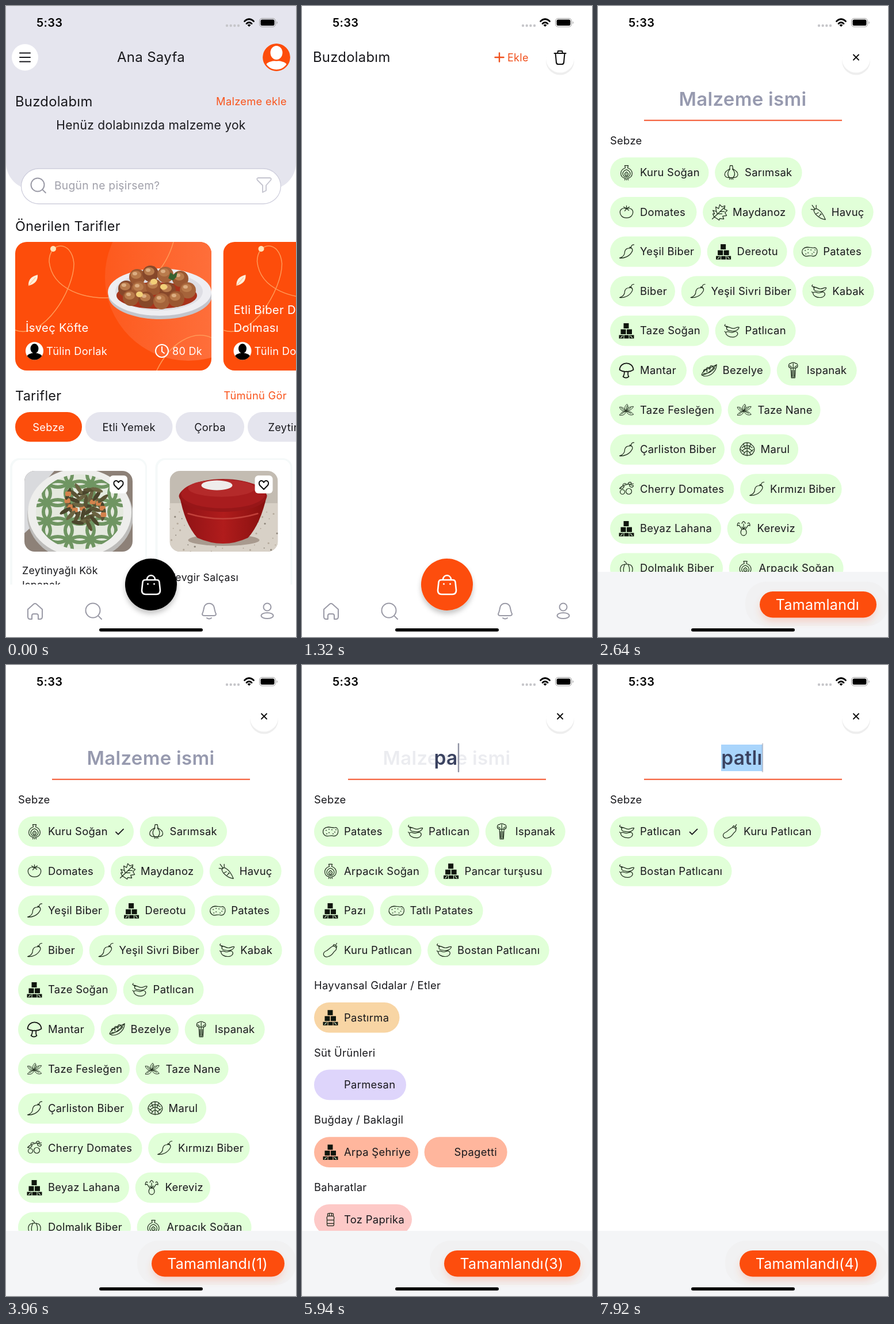
Write an HTML page that moves like this. It is 504 px wide and 1094 px high and loops after 8000 ms.

```html
<!DOCTYPE html>
<html lang="tr">
<head>
<meta charset="utf-8">
<style>
html, body { margin: 0; width: 504px; height: 1094px; overflow: hidden; background: #fff; }
svg { display: block; }
text { font-family: Inter, "Open Sans", sans-serif; letter-spacing: .3px; white-space: pre; }
</style>
</head>
<body>
<svg id="stage" width="504" height="1094" viewBox="0 0 504 1094">
  <defs>
    <filter id="soft" x="-40%" y="-40%" width="180%" height="200%">
      <feDropShadow dx="0" dy="6" stdDeviation="4" flood-opacity=".22"/>
    </filter>
    <filter id="glow" x="-20%" y="-60%" width="140%" height="260%">
      <feDropShadow dx="0" dy="8" stdDeviation="6" flood-color="#ff6a3a" flood-opacity=".2"/>
    </filter>
    <linearGradient id="sheen"><stop stop-color="#fd5a1e"/><stop offset="1" stop-color="#ff7a4a"/></linearGradient>
    <linearGradient id="bowl"><stop stop-color="#8d1215"/><stop offset=".5" stop-color="#b01c1c"/><stop offset="1" stop-color="#86100f"/></linearGradient>
    <clipPath id="card"><rect x="16" y="409" width="341" height="223" rx="20"/></clipPath>
    <clipPath id="photo"><rect x="32" y="806" width="188" height="140" rx="18"/></clipPath>
    <clipPath id="plate"><ellipse cx="128" cy="877" rx="76" ry="65"/></clipPath>
    <clipPath id="feed"><rect y="760" width="504" height="243"/></clipPath>
    <clipPath id="list"><rect y="200" width="504" height="781"/></clipPath>
    <clipPath id="roundButton"><rect x="415" y="80" width="70" height="50"/></clipPath>
    <clipPath id="avatar"><circle r="15.5"/></clipPath>
    <clipPath id="profile"><circle r="23.5"/></clipPath>
  </defs>
  <g id="view"></g>
  <g id="system"></g>
</svg>
<script>
const LOOP = 8000, STEP = 330;
const ORANGE = '#fd4d0b', INK = '#18181c', MIST = '#e5e5ee', GREY = '#9a9aa6';
const $ = id => document.getElementById(id);

const text = (x, y, s, size = 18.5, fill = INK, anchor = 'start', weight = 400) =>
  `<text x="${x}" y="${y}" font-size="${size}" fill="${fill}" text-anchor="${anchor}" font-weight="${weight}">${s}</text>`;
const rect = (x, y, w, h, rx, fill, more = '') =>
  `<rect x="${x}" y="${y}" width="${w}" height="${h}" rx="${rx}" fill="${fill}" ${more}/>`;
const circle = (x, y, r, fill, more = '') => `<circle cx="${x}" cy="${y}" r="${r}" fill="${fill}" ${more}/>`;
const oval = (x, y, rx, ry, fill, more = '') =>
  `<ellipse cx="${x}" cy="${y}" rx="${rx}" ry="${ry}" fill="${fill}" ${more}/>`;
const line = (d, stroke = INK, width = 2) =>
  `<path d="${d}" fill="none" stroke="${stroke}" stroke-width="${width}" stroke-linecap="round" stroke-linejoin="round"/>`;
const at = (x, y, body) => `<g transform="translate(${x} ${y})">${body}</g>`;

function systemBar() {
  const dots = [384, 390.7, 397.3, 404].map(x => circle(x, 34, 2.2, '#c6c6ca')).join('');
  const wifi = line('M414.500 26.500Q422.500 19 430.500 26.500M418 30.500Q422.500 26.500 427 30.500', '#000', 2.7)
    + '<path d="M419.500 33Q422.500 30.500 425.500 33L422.500 36Z"/>';
  const battery = rect(440.5, 21.5, 28, 14.5, 4.5, 'none', 'stroke="#999"')
    + rect(442.5, 23.5, 24, 10.5, 2.8, '#000') + '<path d="M470.500 26.500q2.500 2 0 5z" fill="#999"/>';
  return text(53, 36, '5:33', 20, '#000', 'start', 600) + dots + wifi + battery + rect(162, 1079, 180, 5.5, 2.75, '#000');
}

const magnifier = (x, y, r) =>
  line(`M${x + r * .75} ${y + r * .75}l${r * .45} ${r * .45}`, GREY) + circle(x, y, r, 'none', `stroke="${GREY}" stroke-width="2"`);

function navBar(color) {
  const bag = line('M242 995h20q4 0 4.500 4l1.500 14q0 7-7 7h-18q-7 0-7-7l1.500-14q.5-4 4.500-4M245 994c1-9 13-9 14 0', '#fff', 2.6)
    + circle(246.5, 1002, 1.5, '#fff') + circle(257.5, 1002, 1.5, '#fff');
  return line('M38 1046l10-9q2.500-2 5 0l10 9v13q0 4-4 4h-3v-6q0-3-3-3h-5q-3 0-3 3v6h-3q-4 0-4-4z', GREY)
    + magnifier(151, 1048, 12.5)
    + line('M341 1054c2-4 2-6 3-10c1-11 17-11 18 0c1 4 1 6 3 10q0 3-4 3h-16q-4 0-4-3M349 1061q4 3 8 0', GREY)
    + circle(454, 1042, 6.5, 'none', `stroke="${GREY}" stroke-width="2"`)
    + oval(454, 1057, 10.5, 5, 'none', `stroke="${GREY}" stroke-width="2"`)
    + circle(252, 1003, 45, color, 'filter="url(#soft)"') + bag;
}

const DISH = [[228, 470], [251, 464], [277, 466], [303, 473], [209, 490], [232, 491], [257, 487],
  [281, 493], [316, 493], [217, 506], [244, 509], [270, 512], [296, 508]];

function dish() {
  const balls = DISH.map(([x, y], i) => circle(x, y, 14, ['#9a5731', '#87482a', '#a5633a'][i % 3])
    + oval(x - 2, y - 4, 9, 7, '#b97b4c') + oval(x - 4, y - 6, 4, 3, '#dcae82')).join('');
  return oval(268, 502, 90, 41, '#c3c5cc') + oval(267, 496, 90, 41, '#eeeef2') + oval(266, 495, 76, 33, '#dedee4')
    + oval(262, 502, 70, 23, '#a8331b') + balls
    + [[257, 478], [232, 500], [274, 487]].map(p => oval(...p, 6, 5, '#f2cf78')).join('')
    + '<path d="M282 472l4-10 5 4 7-5-2 9-6 6z" fill="#37612f"/>';
}

const cook = (x, y) => at(x, y, circle(0, 0, 15.5, '#fff')
  + `<g clip-path="url(#avatar)">${oval(0, -4, 7, 8.5, '#000')}${oval(0, 10, 13, 6.5, '#000')}</g>`);

function featured(x, title, plate) {
  const swirl = line('M16 562C66 580 119 490 118 446C114 405 75 408 75 443C80 492 140 511 190 505C246 493 279 452 291 409M262 632C285 584 325 561 357 575', '#ff9a58', 1.5);
  const heading = title.map((s, i) => text(34, 565 - 31 * (title.length - 1 - i), s, 20.3, '#fff')).join('');
  return at(x - 16, 0, `<g clip-path="url(#card)">${rect(16, 409, 341, 223, 0, ORANGE)}${circle(317, 470, 145, 'url(#sheen)')}${swirl}
    ${circle(82, 421, 5, '#ffe3b8')}<path d="M39 485q-1-15 16-19q1 15-16 19z" fill="#ffeed8"/>${line('M39 485l12-14', '#ffb072', 1)}
    ${plate ? dish() : ''}</g>` + heading + cook(49.5, 598) + text(70, 605, 'Tülin Dorlak', 18.3, '#fff')
    + circle(271, 598, 11, 'none', 'stroke="#fff" stroke-width="2"') + line('M271 591v8l4 3', '#fff')
    + text(289, 605, '80 Dk', 18, '#fff'));
}

function greensPhoto() {
  let pattern = '', greens = '';
  for (let row = 0; row < 5; row++) {
    for (let col = 0; col < 5; col++) {
      pattern += oval(52 + col * 38, 813 + row * 32, 25, 21, 'none', 'stroke="#6f9562" stroke-width="6"');
    }
  }
  for (let i = 0; i < 34; i++) {
    const a = i * 2.4, r = 6 * Math.sqrt(i), x = 138 + r * Math.cos(a) * 1.1, y = 867 + r * Math.sin(a);
    greens += oval(x, y, 11, 3.5, ['#4b452c', '#6b6442', '#5a5334'][i % 3], `transform="rotate(${i * 47} ${x} ${y})"`);
    if (i % 4 == 1) greens += rect(x - 5, y - 4, 10, 8, 2, '#d3824c');
  }
  return rect(32, 806, 188, 140, 0, '#8d8178') + '<path d="M32 806h52q-40 42-30 88l-22 20z" fill="#d9dadd"/>'
    + oval(129, 884, 92, 78, '#bdbcba') + oval(128, 878, 90, 76, '#eeeeec')
    + `<g clip-path="url(#plate)">${rect(32, 806, 188, 140, 0, '#e4e9de')}${pattern}</g>` + greens;
}

function saucePhoto() {
  let specks = '';
  for (let i = 0; i < 70; i++) specks += circle(32 + i * 73.7 % 188, 872 + i * 31.3 % 74, 1 + i % 2 * .6, i % 3 ? '#b5aa9c' : '#8f877c');
  return rect(32, 806, 188, 140, 0, '#c3bcb2') + rect(32, 862, 188, 84, 0, '#d8d1c7') + specks
    + oval(126, 926, 62, 10, '#a89a8e')
    + '<path d="M49 848Q58 898 80 922Q125 942 168 922Q190 898 201 848Z" fill="url(#bowl)"/>'
    + '<path d="M48 850C48 838 78 820 125 820C172 820 201 838 201 850C196 886 54 886 48 850Z" fill="#971618"/>'
    + oval(125, 846, 73, 25, '#a81c1e') + oval(122, 836, 58, 15, '#b42a2a')
    + line('M64 880Q125 898 185 880', '#c2403a', 2.5) + oval(114, 831, 27, 8.5, '#efeceb');
}

function recipe(dx, photo, label) {
  return at(dx, 0, rect(7, 784, 238, 240, 16, '#f5f9f9') + rect(11, 787, 231, 240, 14, '#fff')
    + `<g clip-path="url(#photo)">${photo}</g>` + rect(180, 814, 31, 31, 6, '#fff')
    + line('M195.500 838l-7-7c-4-7 4-11 7-5c3-6 11-2 7 5z', '#111', 2.1) + label);
}

function home() {
  const tabs = [[16, 116, 'Sebze'], [138, 151.5, 'Etli Yemek'], [295, 119, 'Çorba'], [420, 168, 'Zeytinyağlı']]
    .map(([x, w, s], i) => rect(x, 704, w, 51.5, 25.7, i ? MIST : ORANGE)
      + text(x + w / 2, 737, s, 18.3, i ? INK : '#fff', 'middle')).join('');
  return rect(0, 0, 504, 1094, 0, '#fff') + rect(0, -60, 504, 378, 46, MIST)
    + circle(33, 89, 23, '#fff') + line('M24 81.500h18M24 89h18M24 96.500h18', INK, 2)
    + text(252, 97, 'Ana Sayfa', 24, INK, 'middle')
    + at(470, 89, circle(0, 0, 23.5, ORANGE) + `<g clip-path="url(#profile)">${oval(0, 14, 18, 8, '#fff')}${oval(0, -7, 12, 13.5, ORANGE)}${oval(0, -8, 10.5, 12, '#fff')}</g>`
      + circle(0, 0, 22.5, 'none', `stroke="${ORANGE}" stroke-width="2.5"`))
    + text(16, 174, 'Buzdolabım', 23.8) + text(488, 172, 'Malzeme ekle', 18.3, '#f9541c', 'end')
    + text(252, 214, 'Henüz dolabınızda malzeme yok', 21, INK, 'middle')
    + rect(26.5, 282, 451, 61, 30.5, '#fff', 'stroke="#cfcfdd" stroke-width="1.3"')
    + magnifier(55, 310, 11.5) + text(84, 318, 'Bugün ne pişirsem?', 19.2, '#a0a0aa')
    + line('M438 298h21q3 1 1 4l-8 9v9l-6 3v-12l-9-9q-2-3 1-4z', '#c4c4cf', 1.8)
    + text(16, 390, 'Önerilen Tarifler', 23.4)
    + featured(16, ['İsveç Köfte'], true) + featured(377.5, ['Etli Biber Domates', 'Dolması'], false)
    + text(16, 684, 'Tarifler', 23.4) + text(488, 682, 'Tümünü Gör', 18.3, '#f9541c', 'end') + tabs
    + `<g clip-path="url(#feed)">${recipe(0, greensPhoto(), text(28, 985, 'Zeytinyağlı Kök', 17.7) + text(28, 1010, 'Ispanak', 17.7))}
      ${recipe(252.5, saucePhoto(), text(151.5, 997, 'Kevgir Salçası', 17.7, INK, 'end'))}</g>`
    + rect(0, 1003, 504, 91, 0, '#fff') + navBar('#000');
}

const roundButton = icon => `<g clip-path="url(#roundButton)">${circle(448.5, 95, 24.5, '#eee')}${circle(448.5, 91, 24.5, '#fff')}</g>${icon}`;

function fridge() {
  return rect(0, 0, 504, 1094, 0, '#fff') + text(19, 97, 'Buzdolabım', 23.8)
    + line('M335.500 89h15M343 81.500v15', '#f0501c', 2.4) + text(357, 96, 'Ekle', 18, '#f0501c')
    + roundButton(line('M438.500 82h20M444 82l1-4h7l1 4M440.500 82l1.500 16q.5 3 3.500 3h6q3 0 3.500-3l1.500-16', '#111', 2.1)) + navBar(ORANGE);
}

// Ingredient icons, drawn around the origin in a 28 px box.
const thin = (d, width = 1.2) => line(d, '#1e2a1c', width);
const ICONS = {
  onion: thin('M-3-12l1 4C-13-4-12 8-2 10l-1 3M3-12l-1 4C13-4 12 8 2 10l1 3M-3-12h6M0-5c-9 3-8 12 0 13c8-1 9-10 0-13M0-1c-4 2-4 6 0 7c4-1 4-5 0-7M0 2v1M0 10v3'),
  garlic: thin('M-2-12h4l1 6C14-1 14 9 4 9h-8C-14 9-14-1-3-6zM-2-6c-5 5-5 11-1 15M2-6c5 5 5 11 1 15M-2 9l-1 3M0 9v3M2 9l1 3'),
  tomato: thin('M0-6c-15-4-15 16 0 16c15 0 15-20 0-16M0-6l-5-3M0-6l5-3M0-6l-3 4M0-6l4 3M0-6v-5'),
  leaf: thin('M-12 12L9-8M-9 8l-2-5 3 0-3-6 6 2-1-8 5 3 2-7 4 4 5-2-1 6 5 2-4 4 3 5-7 1 2 5-7-1-1 3zM-3 4l-2-6M2-1h7M-1 3h6'),
  carrot: thin('M13 13C4 12-5 5-7-2c0-4 5-5 8-2C7 0 11 8 13 13M-6-4l-6-1M-5-5l-5-7M-3-6v-6M-3 3l4-2M2 7l3-3M6 4l-2-1'),
  chili: thin('M5-6c5-1 7 3 4 7C5 8-4 12-12 11c7-2 9-6 9-11c1-4 4-6 8-6M5-6l1-2 4 3M8-7c0-3 2-5 5-5'),
  blocks: '<g fill="#10160e"><path d="M-5-13h9v9h-9zM-10-2.500h9v8.500h-9zM.500-2.500h9v8.500h-9zM-13 7.500h8v6h-8zM-4 7.500h8v6h-8zM5 7.500h8v6h-8z"/></g>'
    + line('M-10 12l3-3M7 9l3 3', '#e1ffd8', 1.2),
  potato: thin('M-11-5C-4-11 3-5 9-7C16-5 14 8 6 8C0 5-4 10-9 7C-14 4-14-2-11-5M-8-2h1M-3 2h1M2-3h1M7 1h1M-7 4h1M4 4h1M9-3h1M-3-4h1'),
  squash: thin('M-12-9l4 3C-5-9-3-4 3-4C7-4 9-7 13-6C12-1 5 2-2 0C-7 0-10-3-8-6M-12-9l1-2M-9-8l5 2M-10 3C-10 8-4 11 2 11C9 11 12 6 10 3C7-1 4 3 0 3C-5 3-7-1-10 3M-10 3l-2-2'),
  eggplant: thin('M4-7C-1-5-3-1-7 1c-9 3-5 13 3 10C4 9 4 4 8 1c4-3 2-9-4-8M4-7l2-3 5 3-1 4M9-9l2-3'),
  mushroom: line('M-12-1C-11-16 11-16 12-1Q6 3 0 2Q-6 3-12-1M-4 2c1 4 0 6-2 9q5 4 10 0c-2-3-2-5-1-9', '#111', 1.7),
  peas: thin('M-13 8C-11-2 3-4 13-10C13 0 4 11-9 10zM-13 8C-4 8 5 0 13-10M-9 3a3 3 0 1 1 5 0M-4 0a3 3 0 1 1 5-1M2-3a3 3 0 1 1 5-1M-10 6q12 0 20-10'),
  spinach: thin('M-3 13L-4-4M0 13V-5M3 13L4-4M-3 13h6M-4-4c-6-1-4-9 0-8c1-2 7-2 8 0c4-1 6 7 0 8zM-6-8l3 2M6-8L3-6M0-12v6M-2 0v11M2 0v11'),
  basil: thin('M-1 2C-6 2-10 5-12 9C-6 10-2 8-1 2C2 8 7 10 12 8C10 4 5 2-1 2C-5-5-9-5-12-5C-11 0-6 3-1 2C5 2 11-2 12-6C6-6 1-3-1 2C-5-3-2-8 1-10C4-6 3-2-1 2M-9-3l8 5M-9 7l8-5 9 4M-1 2l9-6M1-7l-2 9', 1),
  lettuce: thin('M-11 4C-15-2-9-7-8-8C-5-13 5-13 8-8C13-5 14 1 11 5C8 12-8 12-11 4M-9-3C-2-8 2-8 9-3M-9 3C-2-4 2-4 9 3M-6 8C-2 1 2 1 6 8M0-11V11M-6-9l3 8M6-9L3-1M-11 0l6 5M11 0l-6 5'),
  cherry: thin('M-1 4a5 5 0 1 0 10 0a5 5 0 1 0-10 0M-11 5a4 4 0 1 0 8 0a4 4 0 1 0-8 0M-12-1C-7-7 0-9 12-9M-6-5C-8-11 0-10 0-8M2-8C4-14 10-12 8-9M-12-1q6 2 8-4M5-8c0 6 7 6 7 2z'),
  celery: thin('M-3 1C-7 7-4 12 0 12C4 12 7 7 3 1zM-3 1L-8-6M3 1L8-6M0 1v-9M-11-6q1-6 4-3M11-6q-1-6-4-3M-3-9q3-7 6 0M-8-6l-3 1M8-6l3 1M-3-3L0 1l3-4'),
  pepper: thin('M-5-6C-13-6-12 11-5 10q5 2 10 0C12 11 13-6 5-6Q0-8-5-6M0-7c0-3-1-4-4-5M-3-6c-3 5-3 9-1 16M3-6c3 5 3 9 1 16'),
  jar: thin('M-5-6h10q2 2 1 5v10q0 2-2 2h-8q-2 0-2-2v-10q-1-3 1-5M-5-6v-4q5-2 10 0v4M-6 1h12M-6 7h12M-2-10v3M2-10v3'),
  none: ''
};

const parse = s => s.split(',').map(entry => {
  const [name, icon, width] = entry.split(':');
  return { name, icon, width: +width };
});
const GREEN = '#e1ffd8';
const VEGETABLES = parse('Kuru Soğan:onion:171.5,Sarımsak:garlic:151.5,Domates:tomato:150.5,Maydanoz:leaf:161,Havuç:carrot:125,'
  + 'Yeşil Biber:chili:158,Dereotu:blocks:139,Patates:potato:136.5,Biber:chili:113,Yeşil Sivri Biber:chili:200,Kabak:squash:124.5,'
  + 'Taze Soğan:blocks:172,Patlıcan:squash:140,Mantar:mushroom:133,Bezelye:peas:135.5,Ispanak:spinach:139,Taze Fesleğen:basil:194,'
  + 'Taze Nane:basil:161,Çarliston Biber:chili:199,Marul:lettuce:117.5,Cherry Domates:cherry:215.5,Kırmızı Biber:chili:176.5,'
  + 'Beyaz Lahana:blocks:193,Kereviz:celery:130.5,Dolmalık Biber:pepper:196,Arpacık Soğan:onion:199');
const EGGPLANTS = parse('Kuru Patlıcan:eggplant:186.5,Bostan Patlıcanı:squash:211.5');
const pick = name => VEGETABLES.find(v => v.name == name);
const RESULTS = {
  '': [['Sebze', GREEN, VEGETABLES]],
  pa: [
    ['Sebze', GREEN, [...['Patates', 'Patlıcan', 'Ispanak', 'Arpacık Soğan'].map(pick),
      ...parse('Pancar turşusu:blocks:203.5,Pazı:blocks:104,Tatlı Patates:potato:179'), ...EGGPLANTS]],
    ['Hayvansal Gıdalar / Etler', '#f8d5a4', parse('Pastırma:blocks:148.5')],
    ['Süt Ürünleri', '#ded5fb', parse('Parmesan:none:160')],
    ['Buğday / Baklagil', '#ffb69d', parse('Arpa Şehriye:blocks:181,Spagetti:none:144')],
    ['Baharatlar', '#fdc9c7', parse('Toz Paprika:jar:170')]
  ],
  patl: [['Sebze', GREEN, [pick('Patlıcan'), ...EGGPLANTS]]]
};
RESULTS['patlı'] = RESULTS.patl;

function chip({ name, icon, width }, x, y, color, checked) {
  return rect(x, y - 26.3, width, 52.6, 26.3, color) + at(x + 28.5, y, ICONS[icon]) + text(x + 52, y + 6.3, name, 18.4)
    + (checked ? line(`M${x + width - 31} ${y + 1}l4 4 9-9`, INK, 1.9) : '');
}

function ingredients(query, chosen) {
  let y = 233, out = '';
  for (const [title, color, items] of RESULTS[query]) {
    out += text(21, y + 6.5, title, 18.4);
    y += 55.7;
    let x = 21;
    for (const item of items) {
      const checked = chosen.includes(item.name);
      const width = item.width + (checked ? 29.5 : 0);
      if (x + width > 483) { x = 21; y += 68.6; }
      out += chip({ ...item, width }, x, y, color, checked);
      x += width + 10.6;
    }
    y += 61;
  }
  return `<g clip-path="url(#list)">${out}</g>`;
}

function picker({ query = '', chosen = [], cursor = 0, hint = query ? 0 : 1, selected }) {
  const n = chosen.length, left = [281, 253, 248, 247, 246][n];
  const caret = { '': 249.5, pa: 272, patl: 282, 'patlı': 286 }[query];
  return rect(0, 0, 504, 1094, 0, '#fff')
    + roundButton(line('M444 84.500l9 9M453 84.500l-9 9', '#111', 2))
    + (selected ? rect(214, 138, 72, 46, 0, '#a9d5fc') : '')
    + `<g opacity="${hint}">${text(251.5, 173, 'Malzeme ismi', 33, '#979aaf', 'middle', 600)}</g>`
    + text(250, 173, query, 33.5, '#3a4260', 'middle', 600)
    + rect(caret - 1.2, 135.5, 2.4, 50.5, 1, '#8f92a3', `opacity="${cursor}"`)
    + rect(80, 197.3, 344, 2, 0, '#f4522a') + ingredients(query, chosen)
    + rect(0, 981, 504, 113, 0, '#f4f5f7') + rect(left - 25, 998, 529 - left, 77, 36, '#f1f1f2')
    + rect(left, 1015, 484 - left, 45.5, 22.7, ORANGE, 'filter="url(#glow)"')
    + text((left + 484) / 2 - 1, 1047, 'Tamamlandı' + (n ? `(${n})` : ''), 25, '#fff', 'middle');
}

const push = () => at(-129.5, 0, fridge()) + rect(0, 0, 504, 1094, 0, '#000', 'opacity=".06"')
  + rect(113.5, 0, 2, 1094, 0, '#000', 'opacity=".03"') + at(115.5, 0, picker({}));

const THREE = ['Kuru Soğan', 'Domates', 'Sarımsak'], FOUR = [...THREE, 'Patlıcan'];
const show = state => () => picker(state);
// Each scene holds from its step until the next one.
const SCENES = [
  [0, home], [4, fridge], [7, push], [8, show({})],
  [12, show({ chosen: THREE.slice(0, 1) })],
  [13, show({ chosen: THREE.slice(0, 2) })],
  [15, show({ chosen: THREE })],
  [16, show({ chosen: THREE, cursor: 1 })],
  [18, show({ chosen: THREE, cursor: 1, query: 'pa', hint: .18 })],
  [19, show({ chosen: THREE, cursor: 1, query: 'patl' })],
  [20, show({ chosen: THREE, cursor: 1, query: 'patlı' })],
  [22, show({ chosen: FOUR, cursor: 1, query: 'patlı', selected: true })],
  [23, show({ chosen: FOUR, cursor: 0, query: 'patlı', selected: true })],
  [24, show({ chosen: FOUR, cursor: .45, query: 'patlı', selected: true })]
];

let current;
function frame() {
  const step = Math.floor(performance.now() % LOOP / STEP);
  const [, scene] = SCENES.findLast(([start]) => start <= step);
  if (scene != current) {
    current = scene;
    $('view').innerHTML = scene();
  }
  requestAnimationFrame(frame);
}
$('system').innerHTML = systemBar();
frame();
</script>
</body>
</html>
```
